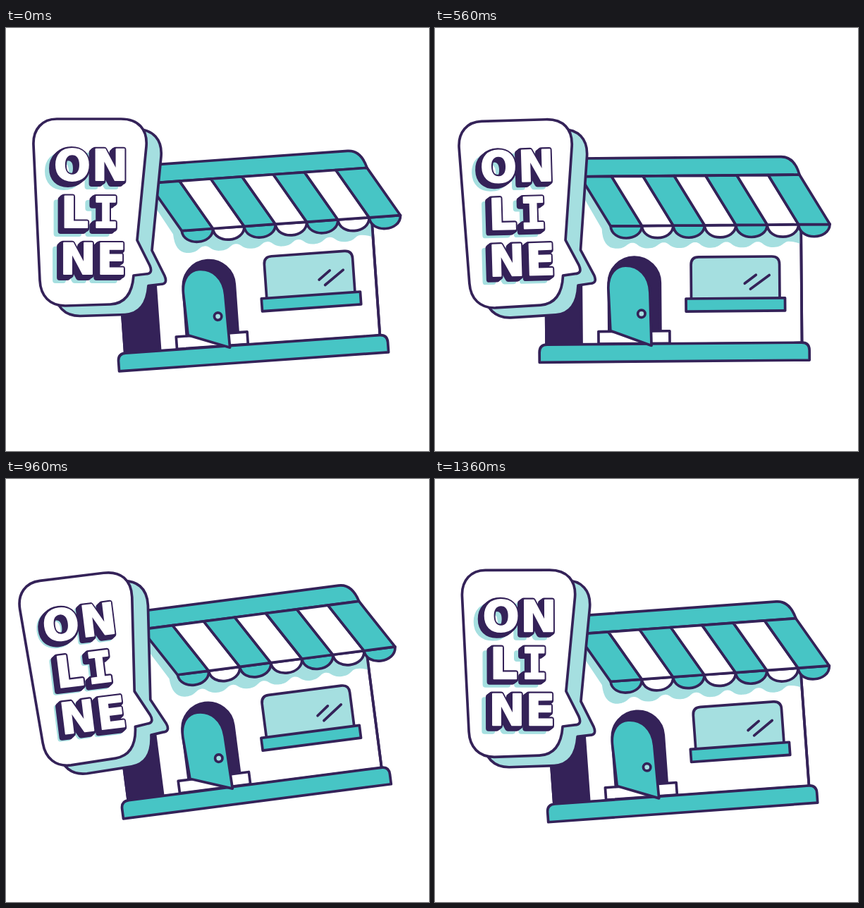
Write an HTML page that moves like this. It is 600 px wide and 600 px high and loops after 1400 ms.

```html
<!DOCTYPE html>
<html lang="en">
<head>
<meta charset="utf-8">
<title>Online shop</title>
<style>
  html, body { margin: 0; height: 100%; overflow: hidden; background: #fff; }
  svg { display: block; width: 100vw; height: 100vh; }
  .line { stroke: #342258; stroke-width: 3.7; stroke-linejoin: round; stroke-linecap: round; }
  .teal { fill: #47c5c5; }
  .pale { fill: #a5dfe0; }
  .dark { fill: #342258; }
  .white { fill: #fff; }
  .none { fill: none; }
  #word { font: bold 61px "DejaVu Sans", sans-serif; text-anchor: middle; stroke-linejoin: round; }
  #word .slab { font-family: "DejaVu Sans Mono", monospace; }
</style>
</head>
<body>
<svg viewBox="0 0 600 600">
  <defs>
    <path id="balloon" d="M72 129H163C188 129 201 144 199 168L186 301L204 337Q209 349 198 349L181 351
      C179 378 168 391 148 392L84 394C62 394 49 380 48 358L39 166C38 143 52 129 72 129Z"/>
    <g id="word">
      <text x="94" y="216">O</text><text x="147.5" y="216">N</text>
      <text x="97.5" y="283">L</text><text x="141.5" y="283" class="slab">I</text>
      <text x="102" y="349">N</text><text x="149.5" y="349">E</text>
    </g>
  </defs>

  <g id="house" class="line">
    <path class="white" d="M157 230H519.5V449H157Z"/>
    <path class="dark" d="M157 345H207V449H157Z"/>
    <path id="shade" class="pale" stroke="none"/>
    <path class="none" d="M519.5 281V449"/>

    <path class="pale" d="M363 386V337Q363 326 374 326H477.5Q488.5 326 488.5 337V386Z"/>
    <path class="teal" d="M355.5 385H496V403H355.5Z"/>
    <path class="none" d="M439 364L455 352M447 372L474 352.5"/>

    <path class="dark" d="M246 448V362A36.5 36.5 0 0 1 319 362V448Z"/>
    <path class="white" d="M231 430.5H332V448H231Z"/>
    <path class="teal" d="M147 473.5V459.5Q147 448.5 158 448.5H519Q530 448.5 530 459.5V473.5Z"/>
    <path class="teal" d="M248 429.5L245.5 370C245 348 257 337.5 270 337.5C289 337.5 304 352 304.5 376L306 451Z"/>
    <circle class="pale" cx="292.2" cy="405.8" r="5.2"/>

    <path class="teal" d="M207 210.5V184.7H492Q511 184.7 518 210.5Z"/>
    <g id="awning"></g>
  </g>

  <g id="bubble">
    <use href="#balloon" class="line pale" x="21" y="14.5"/>
    <use href="#balloon" class="line white"/>
    <use id="glow" href="#word" class="pale" stroke="#a5dfe0" stroke-width="8"/>
    <g id="depth" class="dark" stroke="#342258" stroke-width="8"></g>
    <use href="#word" class="white" stroke="#fff" stroke-width="2"/>
  </g>
</svg>
<script>
const $ = id => document.getElementById(id);

// Awning: slanted stripes, each ending in a scallop
const STRIPES = 7, W = 311 / STRIPES;
$('awning').innerHTML = Array.from({ length: STRIPES }, (_, i) => {
  const top = 207 + i * W, bottom = 249.5 + i * W, fill = i % 2 ? 'white' : 'teal';
  return `<path class="${fill}" d="M${bottom} 281c1 23 ${W - 1} 23 ${W} 0Z"/>
    <path class="${fill}" d="M${top} 210.5h${W}L${bottom + W} 281h${-W}Z"/>`;
}).join('');

$('shade').style.stroke = 'none';
$('shade').setAttribute('d', 'M195 211L237 285Q238 313 258 313' +
  `c14 0 14 -8 ${W / 2} -8s8 8 ${W / 2} 8`.repeat(5) +
  'c14 0 14 -8 22 -8Q511 305 519.5 309V281H249L207 211Z');

$('depth').innerHTML = [1, 2, 3, 4, 5, 6]
  .map(i => `<use href="#word" x="${-i}" y="${i * 0.75}"/>`).join('');

const LOOP = 1400, STEP = 40;
const BEATS = [0, 333, 667, 1000, LOOP];
const HOUSE_TURN = [-4.04, -7.7, 1.7, -7.7, -4.04];
const HOUSE_X = [3, 0, 0, 0, 3];
const HOUSE_Y = [9, 1, 0, 1, 9];
const BUBBLE_TURN = [0, -7.3, 0, -7.3, 0];
const GLOW_BEATS = [0, 333, 600, 800, 1000, LOOP];
const GLOW = [1, 0.35, 0.9, 0.3, 0.4, 1];

// Eased value between the two beats around t
function tween(t, values, beats = BEATS) {
  const i = beats.findIndex(b => b > t) - 1;
  const p = (t - beats[i]) / (beats[i + 1] - beats[i]);
  return values[i] + (values[i + 1] - values[i]) * (1 - Math.cos(Math.PI * p)) / 2;
}

function draw(now) {
  const t = Math.floor(now % LOOP / STEP) * STEP;
  $('house').setAttribute('transform',
    `translate(${tween(t, HOUSE_X)} ${tween(t, HOUSE_Y)}) rotate(${tween(t, HOUSE_TURN)} 214 326)`);
  $('bubble').setAttribute('transform', `rotate(${tween(t, BUBBLE_TURN)} 185 332)`);
  const g = tween(t, GLOW, GLOW_BEATS);
  $('glow').setAttribute('transform', `translate(${-6 - 6 * g} ${4.5 + 4 * g})`);
  requestAnimationFrame(draw);
}
requestAnimationFrame(draw);
</script>
</body>
</html>
```
